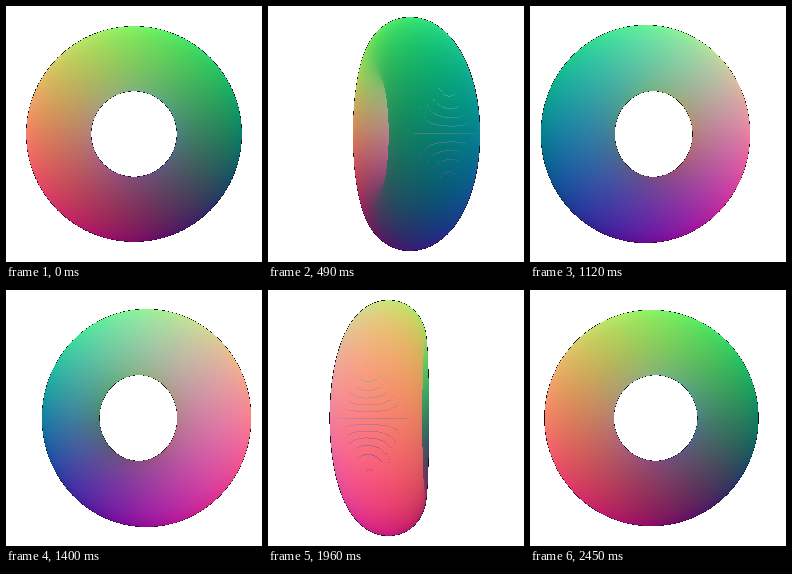
An HTML page with a canvas that plays this animation: 256 by 256 pixels, repeating every 2.52 s.

```html
<!DOCTYPE html>
<html>
<head>
<meta charset="utf-8">
<title>Turning torus</title>
<style>
  html, body { margin: 0; width: 100%; height: 100%; overflow: hidden; background: #fff; }
  canvas { display: block; }
</style>
</head>
<body>
<canvas id="stage" width="256" height="256"></canvas>
<script>
const SIZE = 256, HALF = SIZE / 2, TAU = 2 * Math.PI;
const POSES = 36, POSE_MS = 70;
const RING = 1, TUBE = 0.405, RIM = 0.409;
const RING_POINTS = 1024, TUBE_POINTS = 512;
const CAMERA = 3, FOCAL = HALF / Math.tan(Math.PI / 6);
const TINT = 0.347;

const ctx = document.getElementById('stage').getContext('2d');
const poses = [];

const circle = n => Array.from({ length: n }, (_, i) =>
  ({ cos: Math.cos(i / n * TAU), sin: Math.sin(i / n * TAU) }));
const ringCircle = circle(RING_POINTS), tubeCircle = circle(TUBE_POINTS);

// Projects every point of a torus and hands its pixel, depth and position to plot.
function eachPoint(tube, angle, plot) {
  const sin = Math.sin(angle), cos = Math.cos(angle);
  for (const a of ringCircle) {
    for (const b of tubeCircle) {
      const radius = RING + tube * b.cos;
      const x = radius * a.cos, y = radius * a.sin, z = tube * b.sin;
      const depth = CAMERA - x * sin - z * cos;
      const scale = FOCAL / depth;
      const col = Math.floor(HALF + (x * cos - z * sin) * scale);
      const row = Math.floor(HALF - y * scale);
      plot(row * SIZE + col, depth, x, y, z);
    }
  }
}

function render(pose) {
  const angle = pose / POSES * TAU;
  const image = ctx.createImageData(SIZE, SIZE);
  const nearest = new Float64Array(SIZE * SIZE).fill(Infinity);
  const paint = (pixel, r, g, b) => {
    const i = pixel * 4;
    image.data[i] = r * 255;
    image.data[i + 1] = g * 255;
    image.data[i + 2] = b * 255;
    image.data[i + 3] = 255;
  };

  // A slightly thicker dark torus behind leaves the thin broken outline.
  eachPoint(RIM, angle, pixel => paint(pixel, 0.08, 0.08, 0.08));
  eachPoint(TUBE, angle, (pixel, depth, x, y, z) => {
    if (depth >= nearest[pixel]) return;
    nearest[pixel] = depth;
    paint(pixel, 0.5 - x * TINT, 0.5 + y * TINT, 0.5 - z * TINT);
  });
  return image;
}

function draw() {
  const pose = Math.floor(performance.now() / POSE_MS) % POSES;
  poses[pose] = poses[pose] || render(pose);
  ctx.putImageData(poses[pose], 0, 0);
  requestAnimationFrame(draw);
}
draw();
</script>
</body>
</html>
```
